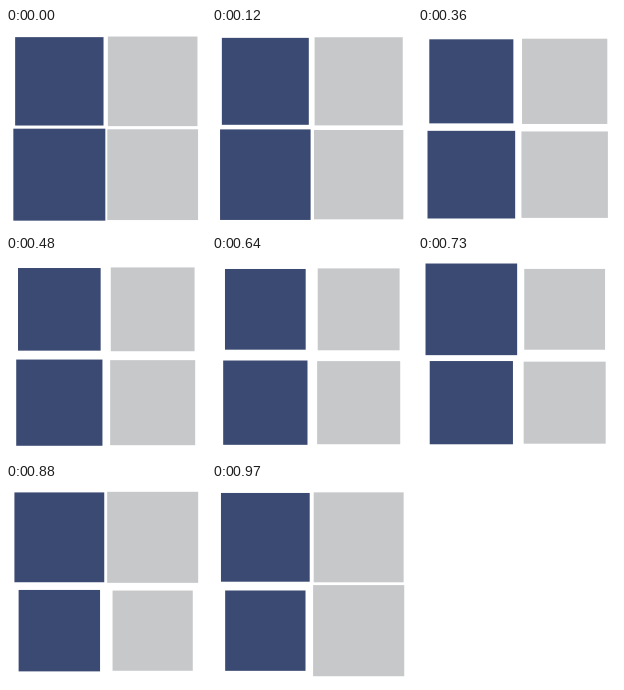
Write an HTML page that moves like this. It is 200 by 200 pixels and loops after 1000 ms.

```html
<!DOCTYPE html>
<html lang="en">
<head>
<meta charset="utf-8">
<title>Pulsing squares</title>
<style>
  html, body { margin: 0; width: 100%; height: 100%; overflow: hidden; background: #fff; }
  svg { display: block; width: 100vw; height: 100vh; }
</style>
</head>
<body>
<svg viewBox="0 0 200 200"></svg>
<script>
const PERIOD = 1000, SIZE = 80, GROWTH = 0.15;
const NEAR = 160 / 3, FAR = 440 / 3;
const BLUE = '#3b4a72', GREY = '#c7c8ca';
const svg = document.querySelector('svg');

// Each square shrinks steadily, then jumps back to full size.
const squares = [
  [NEAR, NEAR, BLUE, 0.3],
  [FAR, NEAR, GREY, 0.2],
  [FAR, FAR, GREY, 0.1],
  [NEAR, FAR, BLUE, 0],
].map(([x, y, fill, phase]) => {
  const rect = document.createElementNS('http://www.w3.org/2000/svg', 'rect');
  rect.setAttribute('fill', fill);
  svg.append(rect);
  return { rect, x, y, phase };
});

function draw(time) {
  for (const { rect, x, y, phase } of squares) {
    const progress = (time / PERIOD + phase) % 1;
    const size = SIZE * (1 + GROWTH * (1 - progress));
    rect.setAttribute('x', x - size / 2);
    rect.setAttribute('y', y - size / 2);
    rect.setAttribute('width', size);
    rect.setAttribute('height', size);
  }
}

const start = performance.now();
function tick() {
  draw(performance.now() - start);
  requestAnimationFrame(tick);
}
tick();
</script>
</body>
</html>
```
